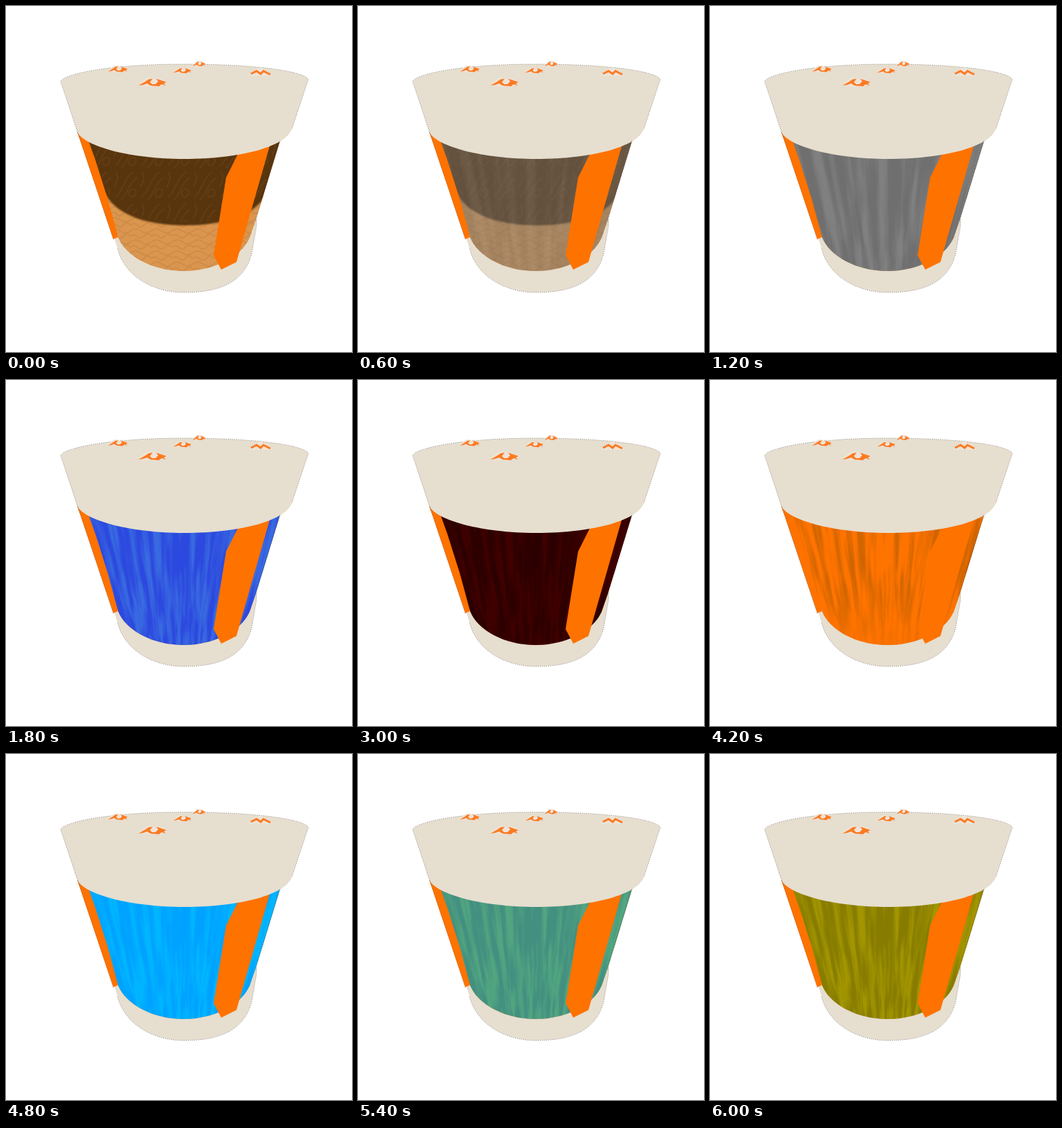
Recreate the animation shown at these times as an HTML page without scripts. Size 500 by 500 pixels, loop 6.6 s.

```html
<!DOCTYPE html>
<html lang="en">
<head>
<meta charset="utf-8">
<title>Cup</title>
<style>
html, body { margin: 0; width: 100%; height: 100%; overflow: hidden; background: #fff; }
.stage { position: absolute; inset: 0; width: 500px; height: 500px; overflow: hidden; }
.stage > svg, .wall > svg { position: absolute; left: 0; top: 0; width: 500px; height: 500px; }
.wall {
  position: absolute; inset: 0;
  clip-path: path("M103 182L162 334C173 362 212 383 257 383C298 383 339 364 352 335L361 309L401 178Z");
}
.skin { position: absolute; inset: 0; opacity: 0; background: var(--base); animation: 6.6s step-end infinite; }
/* streaks narrow towards the foot of the cup */
.skin svg {
  position: absolute; left: 90px; top: 180px; width: 334px; height: 480px;
  transform-origin: 50% 0; transform: perspective(250px) rotateX(-26deg);
}
.skin rect { width: 334px; height: 480px; fill: var(--streak); }
.grey { --base: #6f6f6f; --streak: #808080; animation-name: grey; }
.blue { --base: #2c49df; --streak: #386ae0; animation-name: blue; }
.red { --base: #2c0000; --streak: #400000; animation-name: red; }
.orange { --base: #ff7300; --streak: #d06400; animation-name: orange; }
.cyan { --base: #00a2ff; --streak: #00b6ff; animation-name: cyan; }
.olive { --base: #877c00; --streak: #a29500; animation-name: olive; }
.orange svg { mask-image: linear-gradient(#000 35%, #0004 75%); }
@keyframes grey { 0% { opacity: 0 } 9.09% { opacity: .5 } 18.18%, 100% { opacity: 1 } }
@keyframes blue { 0% { opacity: 0 } 27.27%, 100% { opacity: 1 } }
@keyframes red { 0% { opacity: 0 } 36.36% { opacity: .5 } 45.45%, 100% { opacity: 1 } }
@keyframes orange { 0% { opacity: 0 } 54.54% { opacity: .5 } 63.63%, 100% { opacity: 1 } }
@keyframes cyan { 0% { opacity: 0 } 72.72%, 100% { opacity: 1 } }
@keyframes olive { 0% { opacity: 0 } 81.81% { opacity: .5 } 90.9%, 100% { opacity: 1 } }
</style>
</head>
<body>
<div class="stage">
  <svg viewBox="0 0 500 500">
    <defs>
      <filter id="broad" x="0" y="0" width="1" height="1" color-interpolation-filters="sRGB">
        <feTurbulence type="fractalNoise" baseFrequency=".06 .004" numOctaves="3" seed="4"/>
        <feColorMatrix values="0 0 0 0 0  0 0 0 0 0  0 0 0 0 0  3 0 0 0 -1.1"/>
        <feComposite in="SourceGraphic" operator="in"/>
      </filter>
      <filter id="fine" x="0" y="0" width="1" height="1" color-interpolation-filters="sRGB">
        <feTurbulence type="fractalNoise" baseFrequency=".1 .006" numOctaves="3" seed="9"/>
        <feColorMatrix values="0 0 0 0 0  0 0 0 0 0  0 0 0 0 0  3.4 0 0 0 -1.3"/>
        <feComposite in="SourceGraphic" operator="in"/>
      </filter>
      <filter id="soft"><feGaussianBlur stdDeviation="1.2"/></filter>
      <pattern id="swirl" width="38" height="46" patternUnits="userSpaceOnUse" patternTransform="translate(4 6)">
        <path d="M2 40C14 32 14 12 28 4M10 44C20 38 20 20 34 12M24 30c-6 6 0 14 6 8s-2 -14 -8 -6M2 4C8 10 4 20 0 26" fill="none" stroke="#633d16" stroke-width="1.8"/>
      </pattern>
      <pattern id="wave" width="30" height="16" patternUnits="userSpaceOnUse">
        <path d="M0 5q7.5 -6 15 0t15 0M0 13q5 -5 10 0t10 -1t10 1" fill="none" stroke="#cf8c47" stroke-width="2"/>
      </pattern>
    </defs>
    <path d="M156 334L161 350C170 388 210 414 257 414C308 414 344 400 355 358L362 318L363 308Z" fill="#e6decf"/>
  </svg>

  <div class="wall">
    <svg viewBox="0 0 500 500">
      <path d="M90 170H410V390H90Z" fill="#da964f"/>
      <path d="M90 170H410V390H90Z" fill="url(#wave)"/>
      <path d="M90 170H420L372 278C355 304 310 317 258 317C206 317 162 303 145 274Z" fill="#583410" filter="url(#soft)"/>
      <path d="M110 180H400L368 276C352 300 310 313 258 313C206 313 165 299 149 272Z" fill="url(#swirl)"/>
    </svg>
    <div class="skin grey"><svg><rect filter="url(#broad)"/></svg></div>
    <div class="skin blue"><svg><rect filter="url(#fine)"/></svg></div>
    <div class="skin red"><svg><rect filter="url(#fine)"/></svg></div>
    <div class="skin orange"><svg><rect filter="url(#fine)"/></svg></div>
    <div class="skin cyan"><svg><rect filter="url(#fine)"/></svg></div>
    <div class="skin olive"><svg><rect filter="url(#fine)"/></svg></div>
  </div>

  <svg viewBox="0 0 500 500">
    <defs>
      <g id="peak" stroke-linejoin="round">
        <path d="M-20 4L-7 -5L1 -5L3 1L6 -5L19 0L9 5Z" fill="#eee3d6" stroke="#eee3d6" stroke-width="3"/>
        <path d="M-21 5L-12 0L-6 -4L0 -5L-4 0L-1 3L4 3L8 -1L5 -5L11 -3L20 0L16 2L19 5L13 3L9 6L-3 5L-8 2L-14 4Z" fill="#fb7a22"/>
      </g>
    </defs>
    <g fill="#fe7200">
      <path d="M103 182L115 184L120 197L129 222L147 279L162 334L155 337Z"/>
      <path d="M342 200L382 199L333 370L311 381L300 360L318 248Z"/>
    </g>
    <path d="M79 109C84 98 150 84 258 84C360 84 430 94 437 106L413 178C404 203 340 221 257 221C180 221 113 203 103 182Z" fill="#e6decf"/>
    <g fill="none" stroke="#222" stroke-width=".8" stroke-dasharray="1 2" opacity=".65">
      <path d="M155 337L79 109C84 98 150 84 258 84C360 84 430 94 437 106L413 178"/>
      <path d="M396 195L361 308L362 318L355 358C344 400 308 414 257 414C210 414 170 388 161 350"/>
    </g>
    <use href="#peak" transform="translate(212 110)"/>
    <use href="#peak" transform="translate(162 91) scale(.7 .75)"/>
    <use href="#peak" transform="translate(255 93) scale(.65 .7)"/>
    <use href="#peak" transform="translate(279 83.5) scale(.45 .6)"/>
    <path d="M351 101L356 95L368 88L379 95L384 101Z" fill="#eee3d6"/>
    <path d="M354 98L362 94L368 98L372 94L382 99" fill="none" stroke="#fb7a22" stroke-width="3"/>
  </svg>
</div>
</body>
</html>
```
